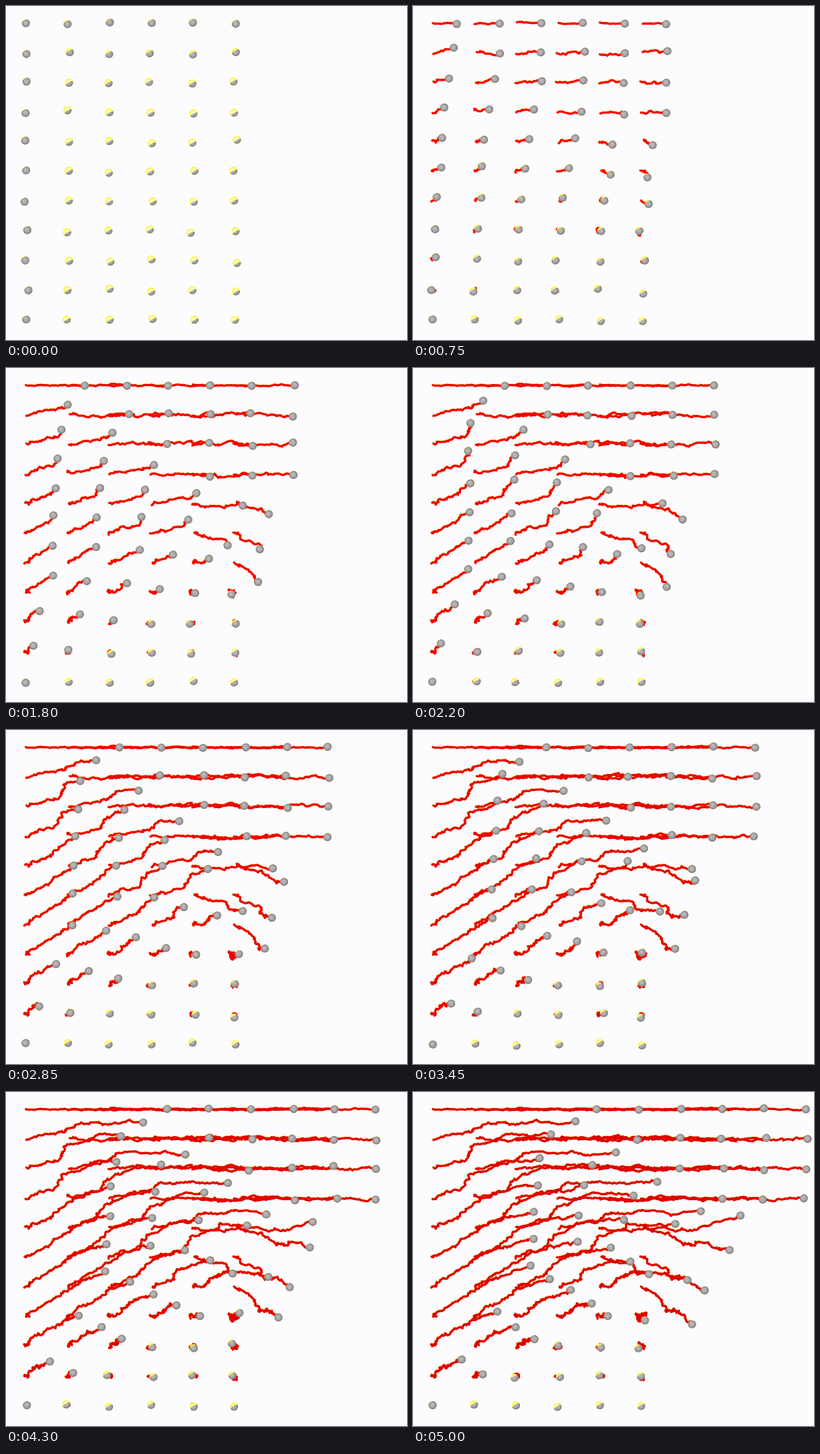
These frames come from a looping animation (600x500 px, 5050 ms). An HTML page with a canvas:

```html
<!DOCTYPE html>
<html lang="en">
<head>
<meta charset="utf-8">
<title>Drifting particles</title>
<style>
html, body { margin: 0; width: 100%; height: 100%; overflow: hidden; background: #fcfcfe; }
canvas { display: block; }
</style>
</head>
<body>
<canvas id="stage" width="600" height="500"></canvas>
<script>
const ctx = document.getElementById('stage').getContext('2d');
const STEP = 50, STEPS = 101, ROWS = 11, COLS = 6, RADIUS = 6.1;

let seed = 4217;
function random() {
  seed = (seed + 0x6D2B79F5) | 0;
  let h = Math.imul(seed ^ (seed >>> 15), 1 | seed);
  h = (h + Math.imul(h ^ (h >>> 7), 61 | h)) ^ h;
  return ((h ^ (h >>> 14)) >>> 0) / 4294967296;
}
const gauss = () => (random() + random() + random() + random() - 2) * 1.73;

// Upper right: steady drift to the right.
const straightPath = () => [[0, 0, 0], [5050, 248, 0]];

// Right of centre: sink first, slower the farther in.
function sinkingPath(row, col) {
  const m = row + col - 8, end = 210 / (1 + 0.6 * m), sink = 36 * (1 - Math.exp(-m));
  return [
    [1400, 51 - 7 * m, 5 + 5 * m],
    [2200, end * 0.46, sink],
    [3450, end * 0.65, sink],
    [5000, end, 62 - 79 * Math.exp(-m)]
  ];
}

// Lower left: climb one or two levels, then level off; weaker near the bottom.
function climbingPath(d, gain) {
  const bend = 1 / (d * d);
  return [
    [1400, 69 * Math.exp(-0.16 * d), -9 - 1.5 * d],
    [2200, 49 + 24 / d, -34 + 11 * bend],
    [3450, 80 + 50 / d, -57 + 33 * bend],
    [5000, 137 + 75 / d, -52 - 3.5 * d + 32 * bend]
  ].map(([t, x, y]) => [t, x * gain, y * gain]);
}

function pathFor(row, col, gain) {
  const d = row - col;
  if (row < 4 && d <= 0) return straightPath();
  const keys = row > 3 && col > 3 && d < 2 ? sinkingPath(row, col) : climbingPath(d, gain);
  const lead = 0.6 - 0.05 * row, [, x, y] = keys[0];
  return [[0, 0, 0], [750, x * lead, y * lead], ...keys];
}

function pointAt(keys, t) {
  const i = Math.max(1, keys.findIndex(key => key[0] >= t));
  const [t0, x0, y0] = keys[i - 1], [t1, x1, y1] = keys[i];
  const k = (t - t0) / (t1 - t0);
  return [x0 + (x1 - x0) * k, y0 + (y1 - y0) * k];
}

function makeParticle(row, col) {
  const gain = Math.max(0, Math.min(1, 1 - 0.24 * (1.5 * row + col - 10.6)));
  const still = gain < 0.05;
  const keys = pathFor(row, col, gain);
  const spread = still ? 1.2 + 0.7 * (10 - row) : row ? 1.7 : 0.8;
  const memory = still ? 0.92 : 0.8;
  const kick = spread * Math.sqrt(1 - memory * memory);
  const startSpread = Math.min(spread, 1.7);
  let nx = gauss() * startSpread, ny = gauss() * startSpread;
  const points = [];
  for (let n = 0; n < STEPS; n++) {
    const [dx, dy] = pointAt(keys, n * STEP);
    points.push([29.5 + 62.6 * col + dx + nx, 26 + 44.4 * row + dy + ny]);
    nx = nx * memory + gauss() * kick;
    ny = ny * memory + gauss() * kick;
  }
  return { row, col, still, points };
}

const particles = [];
for (let col = 0; col < COLS; col++)
  for (let row = 0; row < ROWS; row++) particles.push(makeParticle(row, col));

function strokeTrail(points, last, shift, color, width) {
  ctx.beginPath();
  for (let n = 0; n <= last; n++) ctx.lineTo(points[n][0] + shift, points[n][1] + shift);
  ctx.strokeStyle = color;
  ctx.lineWidth = width;
  ctx.stroke();
}

function disc(x, y, r, color) {
  ctx.beginPath();
  ctx.arc(x, y, r, 0, Math.PI * 2);
  ctx.fillStyle = color;
  ctx.fill();
}

function radial(x, y, ...stops) {
  const gradient = ctx.createRadialGradient(x, y, 1, 0, 0, RADIUS);
  stops.forEach((color, i) => gradient.addColorStop(i / (stops.length - 1), color));
  return gradient;
}

function litShare({ row, col, still }, t) {
  const start = col ? 0.5 * Math.min(1, (row + 0.8) / 3.5) : 0.06;
  const rest = still && col ? 0.18 * row - 1.1 : 0;
  return start * Math.max(rest, 1 - t / (200 + 140 * row));
}

function drawBall(particle, n) {
  const reach = RADIUS + 12 * litShare(particle, n * STEP);
  ctx.save();
  ctx.translate(...particle.points[n]);
  disc(0, 0, RADIUS, radial(0, 0, '#fffff0', '#ffff90', '#fcee30'));
  ctx.clip();
  disc(reach * 0.5, reach * 0.866, 12, radial(-1, -1, '#bcb8be', '#a9a5ac', '#7c7878'));
  ctx.restore();
}

function draw(n) {
  ctx.fillStyle = '#fcfcfe';
  ctx.fillRect(0, 0, 600, 500);
  ctx.lineJoin = ctx.lineCap = 'round';
  if (n > 0) {
    const red = `rgb(${Math.round(255 - n * 0.32)},0,0)`;
    for (const { points } of particles) strokeTrail(points, n, -0.6, 'rgba(245,220,40,.6)', 3.4);
    for (const { points } of particles) strokeTrail(points, n, 0, red, 3.3);
  }
  for (const particle of particles) drawBall(particle, n);
}

const begin = performance.now();
let shown = -1;
function tick() {
  const n = Math.floor((performance.now() - begin) / STEP) % STEPS;
  if (n !== shown) draw(shown = n);
  requestAnimationFrame(tick);
}
tick();
</script>
</body>
</html>
```
